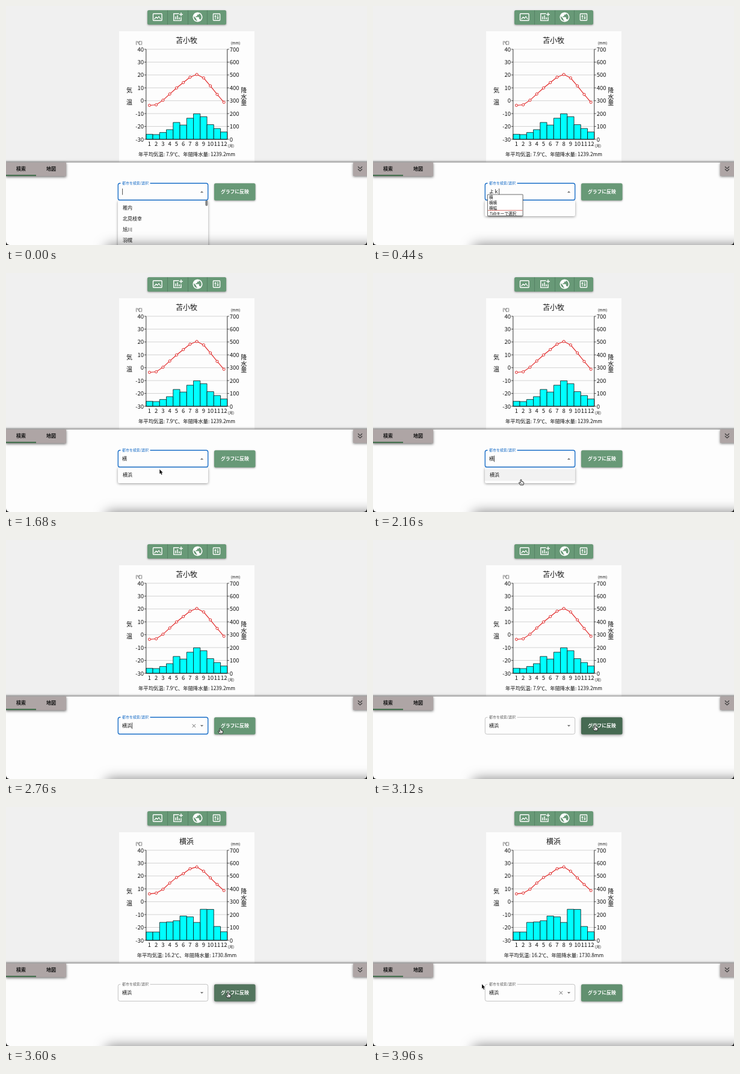
Write an HTML page with a canvas that moves like this. It is 600x398 px and loops after 4 s.

```html
<!DOCTYPE html>
<html lang="ja">
<head>
<meta charset="utf-8">
<title>雨温図</title>
<style>
html, body { margin: 0; width: 100%; height: 100%; overflow: hidden; background: #f0f0f0; }
canvas { display: block; width: 600px; height: 398px; }
</style>
</head>
<body>
<canvas id="stage"></canvas>
<script>
const W = 600, H = 398, LOOP = 4000;
const canvas = document.getElementById('stage');
const c = canvas.getContext('2d');
const ratio = window.devicePixelRatio || 1;
canvas.width = W * ratio;
canvas.height = H * ratio;

const FONT = '"Noto Sans CJK JP", "Noto Sans CJK", "Noto Sans", sans-serif';
const PAPER = '#fdfdfd', TAUPE = '#aea5a5', BLUE = '#1b6fc8';
const GREEN = [104, 153, 119], DARK_GREEN = [70, 106, 82];

// Moments of the interaction, in ms
const TYPE = 200, YO = 320, YOK = 400, KANJI = 560, COMMIT = 920;
const PICK = 2280, ENTER = 2727, PRESS = 3090, UPDATE = 3200, LEAVE = 3780;

const CITIES = [
  { name: '苫小牧', mean: '7.9', total: '1239.2',
    temp: [-3.6, -3.2, 0.4, 5.2, 9.9, 14.1, 18.3, 20.4, 17.7, 11.5, 4.9, -1.2],
    rain: [39, 37, 53, 75, 131, 111, 164, 198, 176, 114, 84, 57] },
  { name: '横浜', mean: '16.2', total: '1730.8',
    temp: [6.1, 6.7, 9.7, 14.5, 18.8, 21.8, 25.6, 27, 23.7, 18.5, 13.4, 8.7],
    rain: [64.7, 64.7, 139.5, 143.1, 152.6, 188.8, 182.5, 139, 241.5, 240.4, 107.6, 66.4] }
];

// Pointer: time, x, y
const POINTER = [
  [1320, 262, 310], [1600, 258, 322], [1960, 246, 344], [2400, 246, 344],
  [2760, 356, 313.5], [3000, 369, 308.5], [3760, 369, 308.5], [3920, 181, 295], [4000, 181, 295]
];

const clamp = v => Math.max(0, Math.min(1, v));
const ease = v => { v = clamp(v); return v * v * (3 - 2 * v); };
const inside = (p, x, y, w, h) => p && p.x >= x && p.x <= x + w && p.y >= y && p.y <= y + h;

function text(s, x, y, size, color = '#111', align = 'left', weight = 400) {
  c.font = `${weight} ${size}px ${FONT}`;
  c.textAlign = align;
  c.textBaseline = 'middle';
  c.fillStyle = color;
  c.fillText(s, x, y);
}

function line(points, color, width = 1) {
  c.beginPath();
  points.forEach(([x, y]) => c.lineTo(x, y));
  c.strokeStyle = color;
  c.lineWidth = width;
  c.stroke();
}

function box(x, y, w, h, r = 0) {
  c.beginPath();
  c.roundRect(x, y, w, h, r);
}

function fillBox(x, y, w, h, color, r = 0) {
  box(x, y, w, h, r);
  c.fillStyle = color;
  c.fill();
}

function shadowBox(x, y, w, h, color, r, alpha, blur, dy = 1) {
  c.save();
  c.shadowColor = `rgba(0,0,0,${alpha})`;
  c.shadowBlur = blur * ratio;
  c.shadowOffsetY = dy * ratio;
  fillBox(x, y, w, h, color, r);
  c.restore();
}

function poly(points, color) {
  c.beginPath();
  points.forEach(([x, y]) => c.lineTo(x, y));
  c.closePath();
  c.fillStyle = color;
  c.fill();
}

const GLOBE = new Path2D('M12 2C6.5 2 2 6.5 2 12s4.5 10 10 10 10-4.5 10-10S17.5 2 12 2z' +
  'm-1 17.9c-4-.5-7-3.8-7-7.9 0-.6.1-1.2.2-1.8L9 15v1c0 1.1.9 2 2 2z' +
  'm6.9-2.5c-.3-.8-1-1.4-1.9-1.4h-1v-3c0-.6-.4-1-1-1H8v-2h2c.6 0 1-.4 1-1V7h2c1.1 0 2-.9 2-2v-.4' +
  'c2.9 1.2 5 4.1 5 7.4 0 2.1-.8 4-2.1 5.4z');

function toolbar() {
  shadowBox(235, 7, 131, 24, `rgb(${GREEN})`, 2.5, 0.4, 3);
  [268.5, 302.5, 334.5].forEach(x => line([[x, 7], [x, 31]], '#527d60', 0.8));
  const white = '#fff';

  box(244.5, 12.7, 14.6, 11.6, 1);
  c.strokeStyle = white;
  c.lineWidth = 1.4;
  c.stroke();
  line([[246.5, 22], [249.5, 18.3], [251.8, 20.5], [254, 17.5], [257.2, 22]], white, 1.2);

  line([[287.5, 12.8], [278.8, 12.8], [278.8, 24.4], [291, 24.4], [291, 18.5]], white, 1.4);
  line([[282, 17.5], [282, 22.3]], white, 1.5);
  line([[285, 15.5], [285, 22.3]], white, 1.5);
  line([[288, 19], [288, 22.3]], white, 1.5);
  line([[291, 11], [291, 17]], white, 1.4);
  line([[288, 14], [294, 14]], white, 1.4);

  c.save();
  c.translate(308.9, 8.9);
  c.scale(0.8, 0.8);
  c.fillStyle = white;
  c.fill(GLOBE);
  c.restore();

  box(344.4, 13, 11.2, 11, 0.8);
  c.strokeStyle = white;
  c.lineWidth = 1.3;
  c.stroke();
  line([[348, 17], [348, 22]], white, 1.1);
  line([[352, 15], [352, 20]], white, 1.1);
  poly([[346, 17.6], [348, 15], [350, 17.6]], white);
  poly([[350, 19.4], [352, 22], [354, 19.4]], white);
}

function chart(city) {
  const left = 232.8, right = 367.8, top = 72, bottom = 222;
  const step = (right - left) / 12, row = (bottom - top) / 7;
  const tempY = v => top + (40 - v) * row / 10;
  const mid = i => left + step * (i + 0.5);

  fillBox(188, 42, 225, 220, PAPER);
  text(city.name, 300, 57, 12, '#111', 'center');
  text('(℃)', 221, 61.5, 7, '#111', 'center');
  text('(mm)', 381.5, 61.5, 6.2, '#111', 'center');
  for (let i = 0; i <= 7; i++) {
    const y = top + i * row;
    line([[left, y], [right, y]], '#c8c8c8', 0.8);
    line([[left - 3, y], [left, y]], '#222', 0.8);
    line([[right, y], [right + 3, y]], '#222', 0.8);
    text(String(40 - i * 10), 229, y, 9.5, '#111', 'right');
    text(String(700 - i * 100), 371.8, y, 9.5);
  }
  city.rain.forEach((v, i) => {
    const h = v / 100 * row;
    c.beginPath();
    c.rect(left + i * step, bottom - h, step, h);
    c.fillStyle = '#00ffff';
    c.fill();
    c.strokeStyle = '#111';
    c.lineWidth = 0.8;
    c.stroke();
    text(String(i + 1), mid(i), 229, 9.5, '#111', 'center');
  });
  line([[left, top], [left, bottom], [right, bottom], [right, top]], '#222', 0.9);
  line(city.temp.map((v, i) => [mid(i), tempY(v)]), '#e02020', 1.1);
  city.temp.forEach((v, i) => {
    c.beginPath();
    c.arc(mid(i), tempY(v), 2, 0, 7);
    c.fillStyle = '#fff';
    c.fill();
    c.strokeStyle = '#e02020';
    c.lineWidth = 1;
    c.stroke();
  });
  text('(月)', 374, 232.3, 6.2, '#111', 'center');
  [...'気温'].forEach((s, i) => text(s, 205, 140.5 + i * 20, 10, '#111', 'center'));
  [...'降水量'].forEach((s, i) => text(s, 395.3, 140.5 + i * 10.3, 10, '#111', 'center'));
  text(`年平均気温: ${city.mean}℃、年間降水量: ${city.total}mm`, 300.5, 247, 8.35, '#111', 'center');
}

function panel() {
  shadowBox(-10, 260.5, 620, 150, PAPER, 0, 0.75, 4, -0.5);
  shadowBox(0, 260.5, 100, 23, TAUPE, 0, 0.55, 4);
  shadowBox(577, 260.5, 30, 22.5, TAUPE, 0, 0.55, 4);
  fillBox(0, 281, 50, 2.2, '#45704f');
  text('検索', 25, 271, 8, '#111', 'center', 700);
  text('地図', 75, 271, 8, '#111', 'center', 700);
  [267.5, 271.5].forEach(y => line([[585, y], [588.5, y + 3.3], [592, y]], '#333', 1.1));
}

function dropdown(t, p) {
  if (t >= PICK) return;
  const full = t < TYPE;
  shadowBox(186, 324, 150, full ? 90 : 26, PAPER, 2, 0.4, 4);
  if (full) {
    ['稚内', '北見枝幸', '旭川', '羽幌'].forEach((s, i) => text(s, 194, 336 + i * 18, 8));
    fillBox(331.3, 323.5, 4, 9.5, '#858585', 2);
  } else if (t >= KANJI) {
    if (inside(p, 186, 327, 150, 19)) fillBox(186, 327, 150, 19, '#f2f2f2');
    text('横浜', 194, 336, 8);
  }
}

function field(t, p) {
  const focused = t < PRESS;
  const hover = inside(p, 186, 295, 150, 28.5);
  const value = t < TYPE ? '' : t < YO ? 'ｙ' : t < YOK ? 'よ' : t < 480 ? 'よｋ' :
    t < KANJI ? 'よこ' : t < PICK ? '横' : '横浜';
  box(186.3, 295.3, 149.4, 28, 3);
  c.strokeStyle = focused ? BLUE : hover ? '#333' : '#bcbcbc';
  c.lineWidth = focused ? 1.4 : 0.9;
  c.stroke();
  fillBox(190.5, 293.5, 49, 4, PAPER);
  text('都市を検索/選択', 193, 295.2, 5.95, focused ? BLUE : '#666');
  text(value, 193, 309, 8);

  const end = 193 + value.length * 8;
  if (t >= TYPE && t < COMMIT) line([[193, 315], [end, 315]], '#333', 0.8);
  const since = t >= PICK ? t - PICK : t - COMMIT;
  if (focused && (since < 0 || since % 1000 < 500)) {
    line([[end + 0.6, 304], [end + 0.6, 314.5]], '#222', 0.8);
  }

  const flip = t < PICK ? -1 : 1;
  poly([[322.9, 309.5 - flip * 1.3], [328.1, 309.5 - flip * 1.3], [325.5, 309.5 + flip * 1.3]], '#666');
  if (t >= PICK && (focused || t > LEAVE + 10)) {
    line([[309.7, 306.8], [315, 312.1]], '#666', 1);
    line([[315, 306.8], [309.7, 312.1]], '#666', 1);
  }
}

function candidates(t) {
  if (t < TYPE || t >= KANJI) return;
  shadowBox(190.5, 314, 58.5, 35.5, '#fff', 0, 0.4, 3);
  box(190.5, 314, 58.5, 35.5);
  c.strokeStyle = '#555';
  c.lineWidth = 0.8;
  c.stroke();
  ['横', '横横', '横幅'].forEach((s, i) => text(s, 193, 319 + i * 8.6, 6.5));
  line([[191, 340.3], [248.5, 340.3]], '#d04a40', 0.8);
  text('Tabキーで選択', 194, 345, 6.6);
}

function button(t) {
  const dark = ease((t - ENTER) / 250) * (1 - ease((t - LEAVE) / 250));
  const color = GREEN.map((v, i) => Math.round(v + (DARK_GREEN[i] - v) * dark));
  shadowBox(346, 295.3, 68.5, 28.4, `rgb(${color})`, 2.5, 0.4 + dark * 0.1, 3 + dark * 2);
  const fade = 1 - clamp((t - UPDATE - 40) / 500);
  if (t > PRESS && fade > 0) {
    c.save();
    box(346, 295.3, 68.5, 28.4, 2.5);
    c.clip();
    c.beginPath();
    c.arc(369, 310, 50 * Math.pow(ease((t - PRESS) / 480), 0.5), 0, 7);
    c.fillStyle = `rgba(255,255,255,${0.25 * fade})`;
    c.fill();
    c.restore();
  }
  text('グラフに反映', 380.3, 309, 7.8, '#fff', 'center', 700);
}

function pointerAt(t) {
  const i = POINTER.findIndex(k => k[0] > t);
  if (i < 1) return null;
  const [t0, x0, y0] = POINTER[i - 1], [t1, x1, y1] = POINTER[i];
  const u = (t - t0) / (t1 - t0);
  return { x: x0 + (x1 - x0) * u, y: y0 + (y1 - y0) * u };
}

const HAND = new Path2D('M-1 .6Q0-.8 1 .6V3.4L3 3.7Q4.8 4 4.6 5.6L3.8 9H-1.2L-3.4 5.8Q-3.8 4.6-2.4 4.9L-1 6z');
const ARROW = new Path2D('M0 0V7.6L1.7 6L3 9L4.3 8.4L3 5.6H5.4z');

function pointer(t, p) {
  if (!p) return;
  c.save();
  c.translate(p.x, p.y);
  c.lineJoin = 'round';
  const onItem = t < PICK && inside(p, 186, 327, 150, 19);
  if (onItem || inside(p, 346, 295, 69, 29)) {
    c.fillStyle = '#fff';
    c.fill(HAND);
    c.strokeStyle = '#111';
    c.lineWidth = 0.9;
    c.stroke(HAND);
    line([[0.2, 6], [0.2, 7.8]], '#111', 0.6);
    line([[2, 6], [2, 7.8]], '#111', 0.6);
  } else if (inside(p, 186, 295, 150, 29)) {
    line([[0, -4], [0, 4]], '#222', 0.8);
    line([[-1.5, -4.3], [1.5, -4.3]], '#222', 0.7);
    line([[-1.5, 4.3], [1.5, 4.3]], '#222', 0.7);
  } else {
    c.strokeStyle = '#fff';
    c.lineWidth = 1.4;
    c.stroke(ARROW);
    c.fillStyle = '#111';
    c.fill(ARROW);
  }
  c.restore();
}

// Soft shade along the lower edge and the rounded window corners
function windowEdge() {
  shadowBox(166, 399, 460, 30, '#999', 8, 0.5, 20, -1);
  c.beginPath();
  c.rect(0, 388, W, 10);
  c.roundRect(0, 300, W, 98, [0, 0, 6, 6]);
  c.save();
  c.clip('evenodd');
  fillBox(0, 390, 8, 8, '#222');
  fillBox(592, 390, 8, 8, '#222');
  c.restore();
}

function draw(t) {
  const p = pointerAt(t);
  c.setTransform(ratio, 0, 0, ratio, 0, 0);
  fillBox(0, 0, W, H, '#f0f0f0');
  toolbar();
  chart(CITIES[t < UPDATE ? 0 : 1]);
  panel();
  dropdown(t, p);
  field(t, p);
  candidates(t);
  button(t);
  windowEdge();
  pointer(t, p);
}

const start = performance.now();
function frame() {
  draw((performance.now() - start) % LOOP);
  requestAnimationFrame(frame);
}
frame();
</script>
</body>
</html>
```
